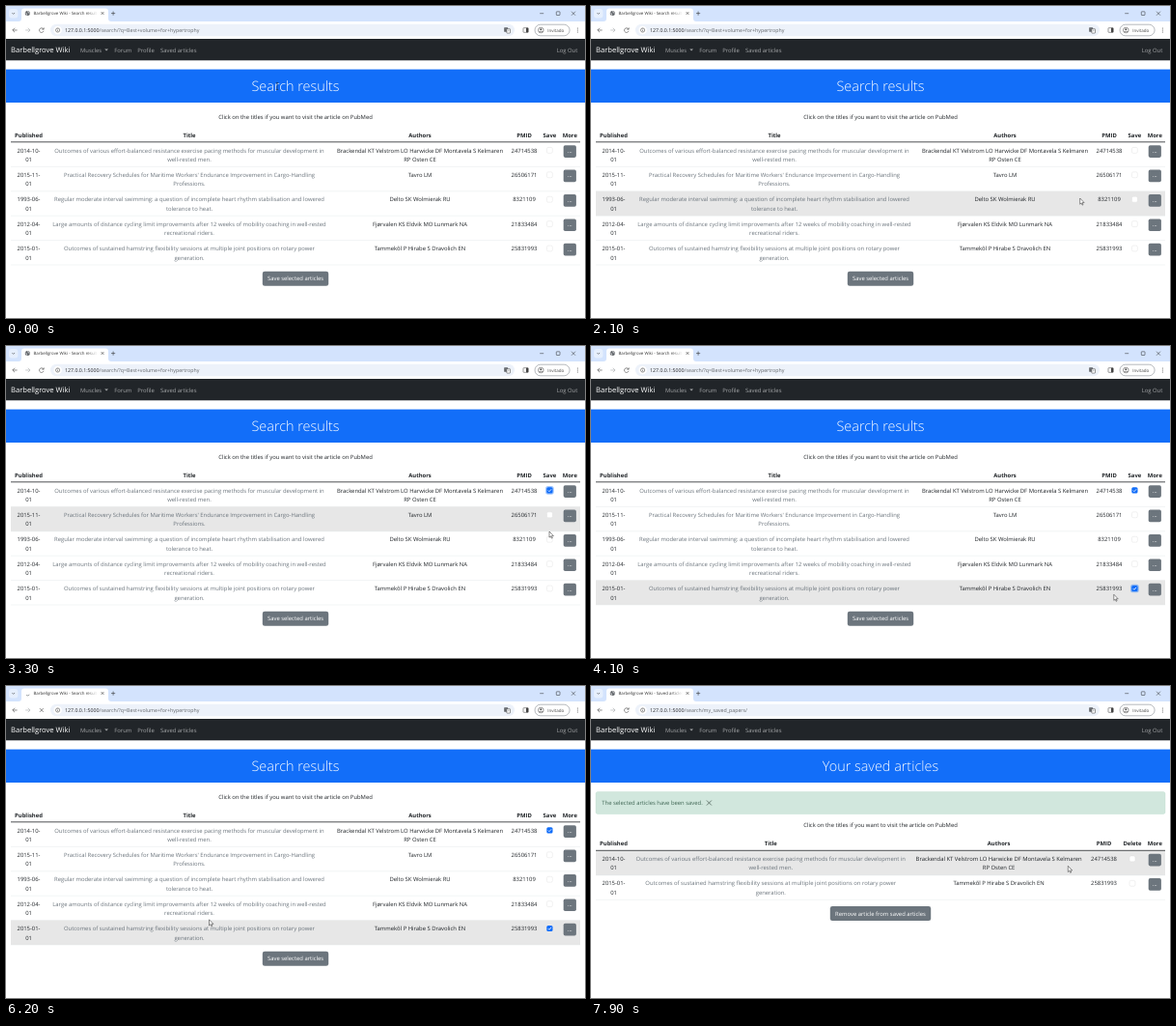
Write an HTML page that moves like this. It is 600 px wide and 323 px high and loops after 8 s.

```html
<!DOCTYPE html>
<html lang="en">
<head>
<meta charset="utf-8">
<title>Search results</title>
<style>
  html, body { margin: 0; width: 100%; height: 100%; overflow: hidden; background: #fff; }
  svg { display: block; width: 100%; height: 100%; }
  text { font-family: "Open Sans", "Noto Sans", sans-serif; font-size: 5.88px; text-rendering: geometricPrecision; white-space: pre; }
</style>
</head>
<body>
<svg id="stage" viewBox="0 0 600 323"></svg>
<script>
const LOOP = 8000, STEP = 100;
const LOAD_START = 5000, LOAD_END = 7200;
const CHECK_FIRST = 2800, CHECK_LAST = 3800, SUBMIT = 4900;
const ROW_H = 25.4;
const SITE = 'Barbellgrove Wiki';
const INK = '#212529', MUTED = '#6c757d', BLUE = '#126ef9', BUTTON = '#6c757d';

const articles = [
  { date: '2014-10-', pmid: '24714538',
    title: ['Outcomes of various effort-balanced resistance exercise pacing methods for muscular development in', 'well-rested men.'],
    authors: ['Brackendal KT Velstrom LO Harwicke DF Montavela S Kelmaren', 'RP Osten CE'] },
  { date: '2015-11-', pmid: '26506171',
    title: ["Practical Recovery Schedules for Maritime Workers' Endurance Improvement in Cargo-Handling", 'Professions.'],
    authors: ['Tavro LM'] },
  { date: '1993-06-', pmid: '8321109',
    title: ['Regular moderate interval swimming: a question of incomplete heart rhythm stabilisation and lowered', 'tolerance to heat.'],
    authors: ['Delto SK Wolmierak RU'] },
  { date: '2012-04-', pmid: '21833484',
    title: ['Large amounts of distance cycling limit improvements after 12 weeks of mobility coaching in well-rested', 'recreational riders.'],
    authors: ['Fjørvalen KS Eldvik MO Lunmark NA'] },
  { date: '2015-01-', pmid: '25831993',
    title: ['Outcomes of sustained hamstring flexibility sessions at multiple joint positions on rotary power', 'generation.'],
    authors: ['Tammekõl P Hirabe S Dravolich EN'] }
];

const searchPage = {
  heading: 'Search results', tab: 'Search results', path: '/search/?q=Best+volume+for+hypertrophy',
  top: 141, rows: articles, action: 'Save selected articles', actionWidth: 68.4,
  columns: { Published: 23.5, Title: 190, Authors: 429, PMID: 537, Save: 563.4, More: 584.3 }
};
const savedPage = {
  heading: 'Your saved articles', tab: 'Saved articles', path: '/search/my_saved_papers/',
  top: 170.5, rows: [articles[0], articles[4]], action: 'Remove article from saved articles', actionWidth: 104.4,
  columns: { Published: 23.5, Title: 186.3, Authors: 422.6, PMID: 531.5, Delete: 561, More: 584.3 }
};

// Pointer path: time, x, y
const path = [
  [0, 281, 83], [500, 281, 83], [700, 341, 83.5], [800, 341, 83.5],
  [1200, 430, 150], [1300, 430, 150], [2100, 506.7, 199], [2300, 510, 198],
  [2750, 563, 149], [3100, 563.5, 153], [3300, 563, 192], [3750, 563.5, 250],
  [3900, 563, 251], [4100, 541.8, 257.2], [4700, 306, 284], [5000, 306, 286],
  [5300, 306.5, 287.5], [5850, 306, 287], [6200, 210.5, 241.8], [6700, 250, 205],
  [7200, 380, 232], [7600, 480, 215], [7900, 494.3, 186.3]
];

function pointer(t) {
  const i = path.findIndex(key => key[0] >= t);
  if (i <= 0) return path[i < 0 ? path.length - 1 : 0].slice(1);
  const [a, b] = [path[i - 1], path[i]];
  const u = (t - a[0]) / (b[0] - a[0]), ease = u * u * (3 - 2 * u);
  return [1, 2].map(k => a[k] + (b[k] - a[k]) * ease);
}

const text = (x, y, str, fill = INK, extra = '') => `<text x="${x}" y="${y}" fill="${fill}" ${extra}>${str}</text>`;
const centred = (x, y, str, fill, extra = '') => text(x, y, str, fill, 'text-anchor="middle" ' + extra);
const box = (x, y, w, h, fill, r = 0, extra = '') => `<rect x="${x}" y="${y}" width="${w}" height="${h}" rx="${r}" fill="${fill}" ${extra}/>`;
const stroke = (d, color = '#444', width = .6, extra = '') => `<path d="${d}" fill="none" stroke="${color}" stroke-width="${width}" ${extra}/>`;
const circle = (x, y, r, fill, extra = '') => `<circle cx="${x}" cy="${y}" r="${r}" fill="${fill}" ${extra}/>`;
const cross = (x, y, r, color, width) => stroke(`M${x - r} ${y - r}l${2 * r} ${2 * r}m0 ${-2 * r}l${-2 * r} ${2 * r}`, color, width);
const outline = 'stroke="#444" stroke-width=".55"';

function tabIcon(t, loading) {
  if (loading) {
    return stroke('M22.4 5.1A2.4 2.4 0 0 1 24.8 7.5', '#80868b', .7, `transform="rotate(${-t * .27} 22.4 7.5)"`);
  }
  return circle(22.3, 7.5, 2.5, '#5f6368') +
    stroke('M20.2 6.6q1.6 1.2 1.4 3M22.6 5.2q-.4 1.6 1.8 2.2', '#fff', .7);
}

function browser(page, t) {
  const loading = t >= LOAD_START && t < LOAD_END;
  return `<defs><linearGradient id="fade" gradientUnits="userSpaceOnUse" x1="84" x2="95">
    <stop stop-color="#333"/><stop offset="1" stop-color="#333" stop-opacity="0"/></linearGradient></defs>` +
    box(0, 0, 600, 16, '#d3e3fd') +
    box(3, 3, 9.4, 9.4, '#e6effd', 3) + stroke('M6.3 7l1.4 1.4 1.4-1.4') +
    '<path d="M13 16q3 0 3-3V5.5q0-3 3-3h84q3 0 3 3V13q0 3 3 3z" fill="#fff"/>' +
    tabIcon(t, loading) +
    text(28.5, 9.2, `${SITE} - ${page.tab}`, 'url(#fade)', 'style="font-size:4.4px"') +
    cross(100, 7.5, 1.4, '#333', .6) + stroke('M109 7.6h4.2M111.1 5.5v4.2', '#333') +
    stroke('M553.2 7.7h4M586 5.7l4 4m0-4l-4 4', '#222', .5) +
    box(570.3, 5.8, 3.7, 3.7, 'none', .5, 'stroke="#222" stroke-width=".5"') +
    box(0, 16, 600, 18, '#fff') +
    stroke('M11.6 25H6.8M9 22.8L6.8 25 9 27.2') +
    stroke('M20.2 25H25M22.8 22.8L25 25l-2.2 2.2', '#a5a8ab') +
    (loading ? cross(36.8, 25, 1.9, '#444', .6)
      : stroke('M38.8 24A2.3 2.3 0 1 0 39 25.8M39.2 22.4V24.2H37.4')) +
    box(46, 18.8, 481, 12.4, '#edf2fa', 6.2) +
    circle(53.6, 25, 4.3, '#fff') + circle(53.6, 25, 2.1, 'none', outline) + stroke('M53.6 24.7v1.5M53.6 23.6v.5') +
    text(61, 26.9, `127.0.0.1:5000<tspan fill="#5f6368">${page.path}</tspan>`, '#202124', 'style="font-size:5.25px"') +
    box(516.2, 22.2, 3.9, 4.6, '#5f6368', .5) + box(518.8, 23.7, 3.7, 4.4, '#fff', .5, outline) +
    stroke('M517.2 23.6h1.8M519.7 25.2h2M520.7 24.6q0 1.5-.9 2.2', '#8a8e92', .4) +
    box(536, 22.7, 5.2, 4.6, 'none', .6, outline) + box(539, 22.7, 2.2, 4.6, '#444') +
    box(548, 19.2, 36.1, 11.6, '#fff', 5.8, 'stroke="#858b92" stroke-width=".6"') +
    circle(554.3, 25, 2.8, 'none', outline) + circle(554.3, 24.2, .9, '#444') + stroke('M552.5 26.8q1.8-1.3 3.6 0') +
    text(561.2, 26.6, 'Invitado', '#444', 'style="font-size:4.5px"') +
    [23, 25, 27].map(y => circle(592.3, y, .5, '#444')).join('');
}

function navbar() {
  const link = '#a3a5a7';
  return box(0, 34, 600, 22.3, INK) +
    text(5, 48.1, SITE, '#fff', 'style="font-size:7.6px;font-weight:500"') +
    text(77, 47.5, 'Muscles', link) + `<path d="M102.2 44.5h3.8l-1.9 1.9z" fill="${link}"/>` +
    text(112.2, 47.5, 'Forum', link) + text(136.2, 47.5, 'Profile', link) +
    text(160, 47.5, 'Saved articles', link) +
    text(592.3, 47.5, 'Log Out', link, 'text-anchor="end"');
}

function checkbox(x, y, checked, focused) {
  const ring = focused ? box(x - 4.3, y - 4.3, 8.6, 8.6, '#0d6efd66', 2.6) : '';
  if (!checked) return box(x - 2.95, y - 2.95, 5.9, 5.9, '#fff', 1.5, 'stroke="#dcdcdc" stroke-width=".4"');
  return ring + box(x - 3.1, y - 3.1, 6.2, 6.2, BLUE, 1.5) +
    stroke(`M${x - 1.6} ${y + .1}l1.1 1.2 2.2-2.4`, '#fff', .8);
}

function tableRow(page, article, i, t, hovered) {
  const [date, title, authors, pmid, tick, more] = Object.values(page.columns);
  const y = page.top + i * ROW_H, line1 = y + 10.5, line2 = y + 19.9;
  const lines = (x, pair, fill) => pair.map((s, k) => centred(x, k ? line2 : line1, s, fill)).join('');
  const onSearch = page === searchPage;
  const first = onSearch && i === 0, last = onSearch && i === 4;
  const checked = first && t >= CHECK_FIRST || last && t >= CHECK_LAST;
  const focused = first && t < CHECK_LAST || last && t < SUBMIT;
  return (hovered ? box(5, y, 590, ROW_H, '#e7e7e7') : '') +
    stroke(`M5 ${y + ROW_H}h590`, '#dee2e6', .4) +
    lines(date, [article.date, '01']) + lines(title, article.title, MUTED) +
    lines(authors, article.authors) + centred(pmid, line1, article.pmid) +
    checkbox(tick, y + 8.4, checked, focused) +
    box(more - 6.6, y + 3.2, 13.2, 12.7, BUTTON, 1.8) + centred(more, y + 11, '...', '#fff', 'style="font-size:6.2px"');
}

function content(page, t, hover) {
  const { top, rows } = page, bottom = top + rows.length * ROW_H;
  const alert = page === savedPage
    ? box(5, 109.6, 590, 22.9, '#d1e7dd', 2, 'stroke="#badbcc" stroke-width=".4"') +
      text(11.3, 123.4, 'The selected articles have been saved.', '#3f6654') + cross(122.4, 121, 2.5, '#51645b', .8)
    : '';
  return box(0, 56, 600, 267, '#fff') + box(0, 65.6, 600, 34.4, BLUE) +
    centred(300, 87.6, page.heading, '#fff', 'style="font-size:14.4px;font-weight:350"') + alert +
    centred(300, top - 24.4, 'Click on the titles if you want to visit the article on PubMed') +
    Object.entries(page.columns).map(([name, x]) => centred(x, top - 5.5, name, INK, 'font-weight="700"')).join('') +
    rows.map((a, i) => tableRow(page, a, i, t, hover.row === i)).join('') +
    stroke(`M5 ${top - .2}h590`, INK, .8) +
    box(300 - page.actionWidth / 2, bottom + 6.8, page.actionWidth, 15, hover.button ? '#5c636a' : BUTTON, 2.3) +
    centred(300, bottom + 16.4, page.action, '#fff');
}

const cursors = {
  arrow: '<path d="M0 0V6.2L1.4 4.9 2.4 7.1 3.3 6.7 2.4 4.6H4.4Z" fill="#fff" stroke="#222" stroke-width=".5"/>',
  beam: stroke('M-1.2-3.5H1.2M0-3.5V3.5M-1.2 3.5H1.2', '#222', .5),
  hand: '<path d="M0 .6Q.7-.3 1.4.6V3l3 .7q.9.3.7 1.3L4.5 7.6H.6L-1.9 4.7q0-1 .9-.7L0 4.8Z" fill="#fff" stroke="#222" stroke-width=".5"/>'
};

function draw(t) {
  const page = t < LOAD_END ? searchPage : savedPage;
  const [x, y] = pointer(t);
  // Row highlighting trails the pointer by one step.
  const lagged = pointer(Math.max(0, t - STEP))[1];
  const bottom = page.top + page.rows.length * ROW_H;
  const hover = {
    row: lagged < bottom ? Math.floor((lagged - page.top) / ROW_H) : -1,
    button: Math.abs(x - 300) < page.actionWidth / 2 && y > bottom + 7 && y < bottom + 21.7
  };
  const shape = y < 100 ? 'beam' : hover.button ? 'hand' : 'arrow';
  return content(page, t, hover) + browser(page, t) + navbar() +
    `<g transform="translate(${x} ${y})">${cursors[shape]}</g>`;
}

const stage = document.getElementById('stage');
const start = performance.now();
let shown = -1;
function tick() {
  const t = Math.floor((performance.now() - start) % LOOP / STEP) * STEP;
  if (t !== shown) stage.innerHTML = draw(shown = t);
  requestAnimationFrame(tick);
}
tick();
</script>
</body>
</html>
```
